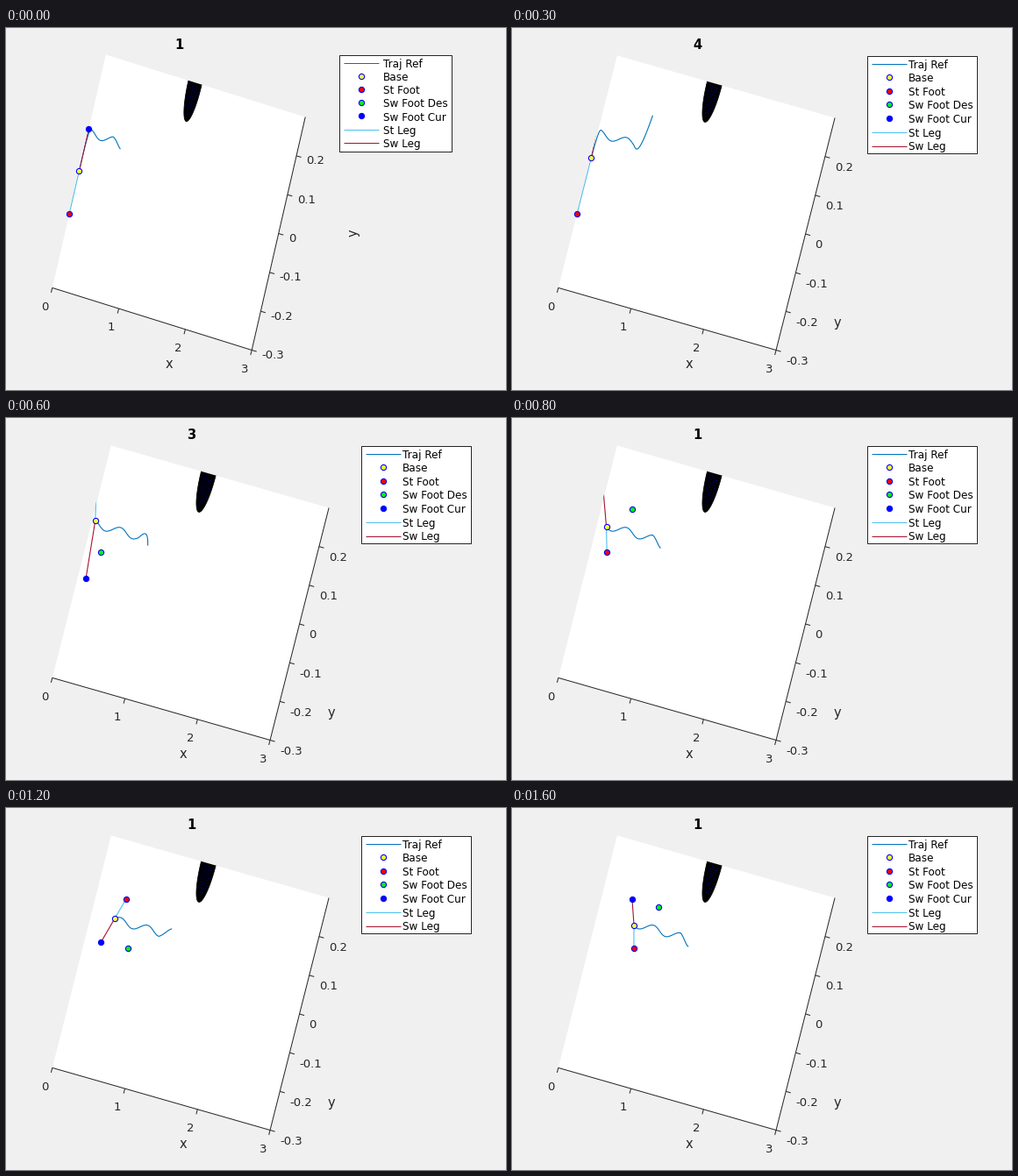
A matplotlib script for the animation above (1700 ms loop, 570x413 px).

```python
import numpy as np
import matplotlib.pyplot as plt
from matplotlib.animation import FuncAnimation
from matplotlib.patches import Polygon, Rectangle

W, H, DPI = 570, 413, 64
PX = 72 / DPI  # one pixel in points
FRAMES, STEP_MS = 17, 100
STEP, HORIZON = 4, 16  # frames per footstep, frames planned ahead

INK = "#262626"
BLUE, CYAN, WINE = "#0072bd", "#4dbeee", "#a2142f"
FILLS = {"Base": "#ffff40", "St Foot": "#ff0000",
         "Sw Foot Des": "#00ff00", "Sw Foot Cur": "#0000ff"}
LINES = {"Traj Ref": BLUE, "St Leg": CYAN, "Sw Leg": WINE}
ENTRIES = ["Traj Ref", *FILLS, "St Leg", "Sw Leg"]

X_SPAN, Y_MIN, Y_MAX = 3.0, -0.3, 0.3
ORIGIN = np.array([52.8, 296.4])


class View:
    """Tilted axes: ex and ey are the screen vectors of one unit."""

    def __init__(self, ex, ey, tick_drop, title_x, xlab, ylab, turn,
                 box, pitch):
        self.basis = np.array([ex, ey])
        self.tick_drop, self.title_x = tick_drop, title_x
        self.xlab, self.ylab, self.turn = xlab, ylab, turn
        self.box, self.pitch = box, pitch

    def screen(self, data):
        return ORIGIN + (np.asarray(data) - (0, Y_MIN)) @ self.basis


FIRST = View(ex=(75.8, 23.7), ey=(101.7, -443.3), tick_drop=4.7,
             title_x=197, xlab=(186, 383), ylab=(396, 234), turn=90,
             box=(379.5, 30.5, 128, 110), pitch=15.25)
MAIN = View(ex=(82.75, 23.7), ey=(111.7, -441.7), tick_drop=11.6,
            title_x=211, xlab=(202, 384), ylab=(371, 336), turn=0,
            box=(404.5, 31.5, 125, 111), pitch=15.6)


def smooth(u):
    u = np.clip(u, 0, 1)
    return u * u * (3 - 2 * u)


def body(t):
    """Sideways shift first, then a steady walk with a swaying wave."""
    x = 0.048 * 0.7 * np.log1p(np.exp((t - 5.4) / 0.7))
    sway = 0.0995 + 0.0095 * np.cos(2 * np.pi * (t - 13.5) / 7.75)
    return np.stack([x, sway * smooth((t - 1) / 4.8)], axis=-1)


def plan(i):
    """Path ahead; its end drifts off more the later in the step."""
    t = np.linspace(i, i + HORIZON, 97)
    pts = body(t)
    step, phase = divmod(i, STEP)
    r = np.clip((t - i - HORIZON + 3) / 3, 0, 1)
    drift = 0.018 * r - 0.0068 * np.exp(0.9 * phase) * r ** 3
    pts[:, 1] -= (-1) ** step * drift
    return pts


def foothold(n):
    """Footholds in order, feet alternating; the first three are given."""
    given = [(0, 0.11), (0, -0.11), (-0.07, 0.203)]
    if n < len(given):
        return np.array(given[n])
    k = n - len(given)
    half = 0.058 + 0.0045 * np.exp(-k)
    return np.array([0.216 + 0.183 * k, 0.098 - (-1) ** k * half])


def feet(i):
    step, phase = divmod(i, STEP)
    start, stance, target = (foothold(step + n) for n in range(3))
    kick = np.array([0.054, -0.022]) * i * np.exp(2 * (1 - i))
    swing = start + (target - start) * phase / STEP + kick
    return stance, target, swing


fig = plt.figure(figsize=(W / DPI, H / DPI), dpi=DPI, facecolor="#f0f0f0")
ax = fig.add_axes([0, 0, 1, 1])


def line(pts, color, clip=None, width=1.0, z=2, **kw):
    art, = ax.plot(*np.transpose(pts), color=color, lw=width * PX,
                   zorder=z, solid_capstyle="butt", **kw)
    if clip is not None:
        art.set_clip_path(clip)


def dot(p, name, z=5):
    ax.plot(*p, "o", ms=6.2 * PX, mfc=FILLS[name], mec="#0000ff",
            mew=1.1 * PX, zorder=z)


def text(x, y, s, size, ha="center", color=INK, **kw):
    # y is the middle of the capitals
    ax.text(x, y + 0.365 * size, s, fontsize=size * PX, ha=ha, va="baseline",
            color=color, family="DejaVu Sans", **kw)


def draw_axes(v):
    corners = v.screen([(0, Y_MIN), (X_SPAN, Y_MIN),
                        (X_SPAN, Y_MAX), (0, Y_MAX)])
    ax.add_patch(Polygon(corners, fc="white", ec="none", zorder=0))
    line(corners[:3], INK)
    for n in range(4):
        p = v.screen((n, Y_MIN))
        line([p, p + (-1.4, 5.5)], INK)
        text(p[0] - 8.3, p[1] + 20.4, str(n), 13.3)
    for n in range(-3, 3):
        p = v.screen((X_SPAN, n / 10))
        line([p, p + (5.5, 1.6)], INK)
        text(p[0] + 11, p[1] + v.tick_drop, f"{n / 10:g}", 13.3, ha="left")
    for pos, name, turn in ((v.xlab, "x", 0), (v.ylab, "y", v.turn)):
        ax.text(*pos, name, fontsize=14.6 * PX, ha="center", va="center",
                rotation=turn, color=INK, family="DejaVu Sans")
    # keep lines that run along the left edge at full width
    clip = Polygon(corners + np.outer((-1, 1, 1, -1), (0.8, 0)),
                   fc="none", ec="none")
    ax.add_patch(clip)
    return clip


def draw_obstacle(v, clip):
    center = np.array([1.342, Y_MAX])
    a = np.linspace(0, 2 * np.pi, 80)
    ring = 0.1 * np.column_stack([np.cos(a), np.sin(a)])
    ball = Polygon(v.screen(center + ring), fc="black", ec="black",
                   lw=0.8 * PX, zorder=2)
    ax.add_patch(ball)
    ball.set_clip_path(clip)
    # blue faces glimpsed through the dense mesh
    for dx in np.linspace(-0.055, 0.055, 4):
        reach = np.sqrt(0.085 ** 2 - dx ** 2)
        ends = center + [(dx, -0.008), (dx * 0.8, -reach)]
        line(v.screen(ends), "#0000a0", clip, 0.9, 3, dashes=(1.2, 2.2))


def draw_legend(v):
    x, y, w, h = v.box
    ax.add_patch(Rectangle((x, y), w, h, fc="white", ec=INK, lw=PX, zorder=6))
    for k, name in enumerate(ENTRIES):
        row = y + 8.9 + k * v.pitch
        if name in FILLS:
            dot((x + 25, row), name, 7)
        else:
            level = np.floor(row) + 0.5
            line([(x + 5, level), (x + 45, level)], LINES[name], z=7)
        text(x + w - 78, row + 0.8, name, 12, ha="left", color="black",
             zorder=7)


def draw(i):
    ax.clear()
    ax.set_axis_off()
    ax.set_xlim(0, W)
    ax.set_ylim(H, 0)
    v = FIRST if i == 0 else MAIN
    clip = draw_axes(v)
    draw_obstacle(v, clip)

    base = body(i)
    stance, target, swing = feet(i)
    line(v.screen(plan(i)), BLUE, clip, 1.1, 3)
    line(v.screen([base, stance]), CYAN, clip, 1.1, 4)
    line(v.screen([base, swing]), WINE, clip, 1.1, 4)
    for p, name in zip((base, stance, target, swing), FILLS):
        if p[0] > -0.01:
            dot(v.screen(p), name)

    draw_legend(v)
    text(v.title_x, 18.7, str(i % STEP + 1), 14.6, color="black",
         weight="bold")
    return []


anim = FuncAnimation(fig, draw, frames=FRAMES, interval=STEP_MS,
                     init_func=lambda: draw(0), repeat=True, repeat_delay=0)
plt.show()
```
